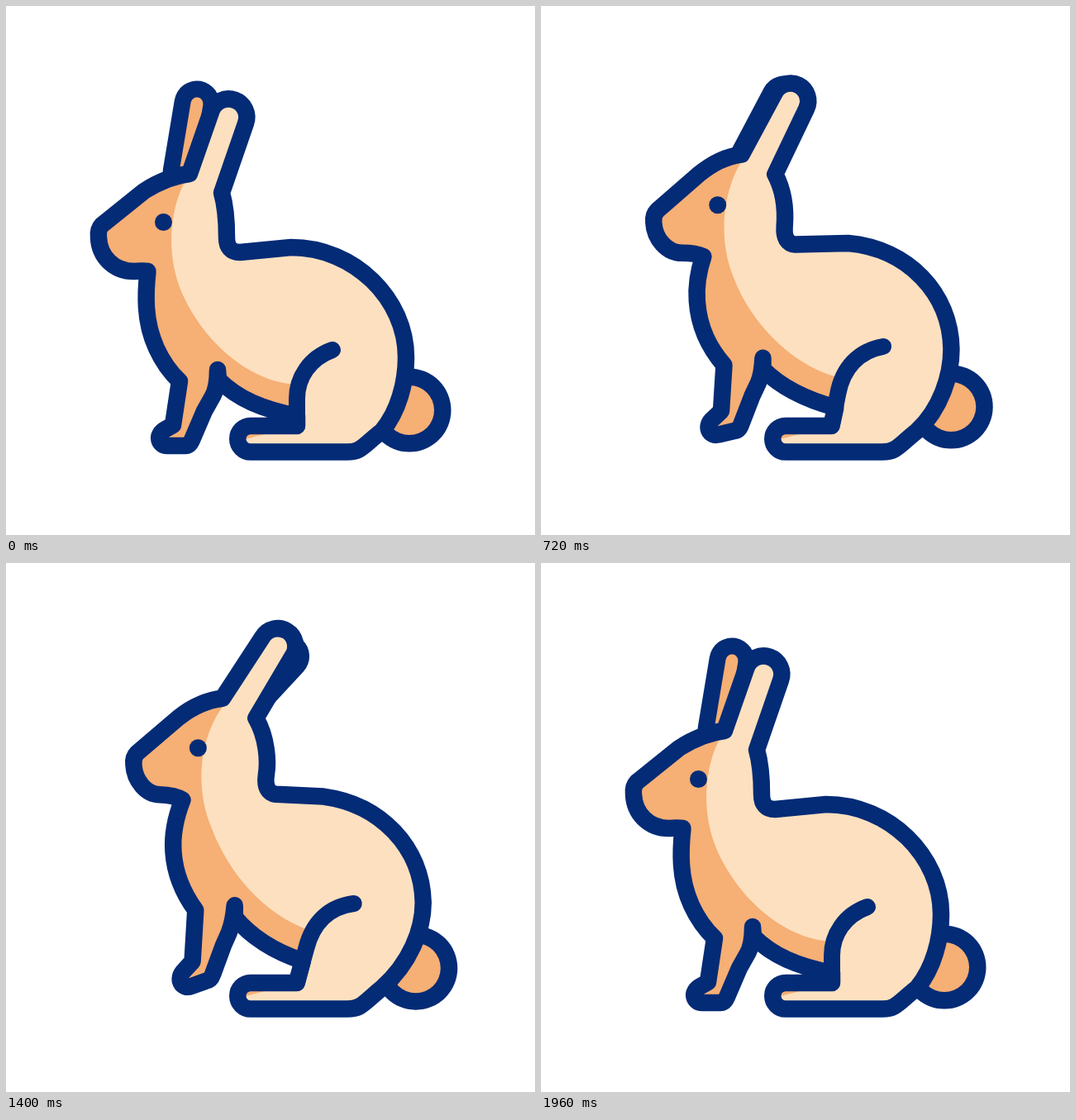
Write an HTML page with a canvas that moves like this. It is 640 px wide and 640 px high and loops after 2 s.

```html
<!DOCTYPE html>
<html>
<head>
<meta charset="utf-8">
<title>Rabbit</title>
<style>
  html, body { margin: 0; width: 100%; height: 100%; overflow: hidden; background: #fff; }
  canvas { display: block; width: 100vmin; height: 100vmin; }
</style>
</head>
<body>
<canvas id="stage" width="640" height="640"></canvas>
<script>
const ctx = document.getElementById('stage').getContext('2d');
const NAVY = '#042b76', ORANGE = '#f6af74', CREAM = '#fde0bf';
const LOOP = 2000, STEP = 40;

// Each part: resting, crouching and raised pose, then an optional arc between the last two.
const body = [
  `M290 142A1 1 0 0 0 248.5 127L222 203Q195 206 167 224L116 265Q111 270 112 280
   C113 303 130 321 155 321Q165 320 171.5 321C170 335 169 350 170 365C172 400 187 432 210 454
   L202 507L193 512C180 519 185 532 195 532L217 532Q222 532 225 525L240 490L249 474Q256 463 256 440
   L257 452C280 475 310 488 352 496L352 508L296 508A1 1 0 0 0 296 539.5L413 539.5
   C430 539.5 432 532 455 514C475 490 484 455 484 425C484 355 422 292 345 292
   L283 298Q267 298 267 280C267 258 265 240 261 226Z`,
  `M266 151A1 1 0 0 0 224 139L202 213Q177 216 149 242L103 284Q97 290 98 299
   C99 320 115 338 138 338Q150 337 160 338C159 350 159 360 160 373C163 415 180 442 205 465
   L202 507L193 512C180 519 185 532 195 532L217 532Q222 532 225 525L240 490L249 473Q252 467 251 450
   L251 462C275 478 305 487 351 495L351 508L296 508A1 1 0 0 0 296 539.5L413 539.5
   C430 539.5 432 532 455 514C472 495 479 455 479 425C479 355 425 297 345 296.5
   L268 307Q254 307 252 290C251 268 249 253 243 237Z`,
  `M379.5 96.5A1 1 0 0 0 345 69.5L286 144Q258 147 234 164L181 208Q176 213 177 222
   C178 241 192 257 205 257Q226 258 235 266C222 295 218 320 219.5 340C221 365 230 385 239 402
   L235 472L225 485C215 497 224 510 236 504L252 495Q258 494 260 487L272 452L278 437Q284 422 287 400
   L287 415C305 442 335 464 362 476L352 508L296 508A1 1 0 0 0 296 539.5L413 539.5
   C430 539.5 432 533 455 514C495 480 515 440 515 405C513 340 465 290 400 277
   L350 269Q335 266 340 243C344 230 343 195 326 168Z`
];
const shade = [
  'M222 203C197 240 193 300 212 345C235 400 290 455 352 458L352 508L150 560L60 300L60 100Z',
  'M202 214C188 250 183 310 203 353C225 405 290 460 351 461L351 508L150 560L60 300L60 100Z',
  'M294 148C255 185 244 250 266 305C285 360 320 412 375 438L352 508L150 560L60 300L60 100Z'
];
const thigh = [
  'M395 416C367 426 352 450 352 475L352 508',
  'M400 412C370 420 352 445 351 475L351 508',
  'M429 412C400 414 379 430 368 463L352 508'
];
const farEar = [
  'M217 202L231 118', 'M200 210L187 135', 'M311 165L391.5 124.5', 'M0 0L32 -72'
];
const tail = [
  'M488 489L488 489.1', 'M491 471.5L491 471.6', 'M492.5 495.5L492.5 495.6', 'M18 7L18 7'
];
const eye = [
  'M190.5 261.5L190.5 261.6', 'M174.5 276.5L174.5 276.6', 'M255.5 202.5L255.5 202.6'
];

const NUM = /-?\d+(\.\d+)?/g;

function ramp(t, from, to) {
  const x = Math.min(1, Math.max(0, (t - from) / (to - from)));
  return x * x * (3 - 2 * x);
}

function pose([rest, low, high, arc], crouch, rise) {
  const [r, l, h, a] = [rest, low, high, arc || ''].map(s => s.match(NUM) || []);
  let i = 0;
  return new Path2D(rest.replace(NUM, () => {
    const base = +r[i] + (l[i] - r[i]) * crouch;
    const bend = (a[i] || 0) * rise * (1 - rise);
    // Arc flags must stay plain digits, so trailing zeros are dropped.
    return +(base + (h[i++] - base) * rise + bend).toFixed(3);
  }));
}

function line(path, width, color) {
  ctx.lineWidth = width;
  ctx.strokeStyle = color;
  ctx.stroke(path);
}

function fill(path, color) {
  ctx.fillStyle = color;
  ctx.fill(path);
}

function draw(t) {
  const crouch = ramp(t, 200, 410) - ramp(t, 1730, 1910);
  const rise = ramp(t, 482, 968) - ramp(t, 1220, 1730);
  const at = part => pose(part, crouch, rise);
  const outline = at(body), ear = at(farEar), puff = at(tail);

  fill(new Path2D('M0 0H640V640H0Z'), '#fff');
  ctx.lineCap = ctx.lineJoin = 'round';
  line(puff, 101, NAVY);
  line(puff, 60, ORANGE);
  line(ear, 55, NAVY);
  line(ear, 15, ORANGE);

  fill(outline, CREAM);
  ctx.save();
  ctx.clip(outline);
  fill(at(shade), ORANGE);
  ctx.restore();
  line(outline, 20.5, NAVY);
  line(at(thigh), 20, NAVY);
  line(at(eye), 21, NAVY);
}

function tick() {
  draw(Math.floor(performance.now() % LOOP / STEP) * STEP);
  requestAnimationFrame(tick);
}
tick();
</script>
</body>
</html>
```
